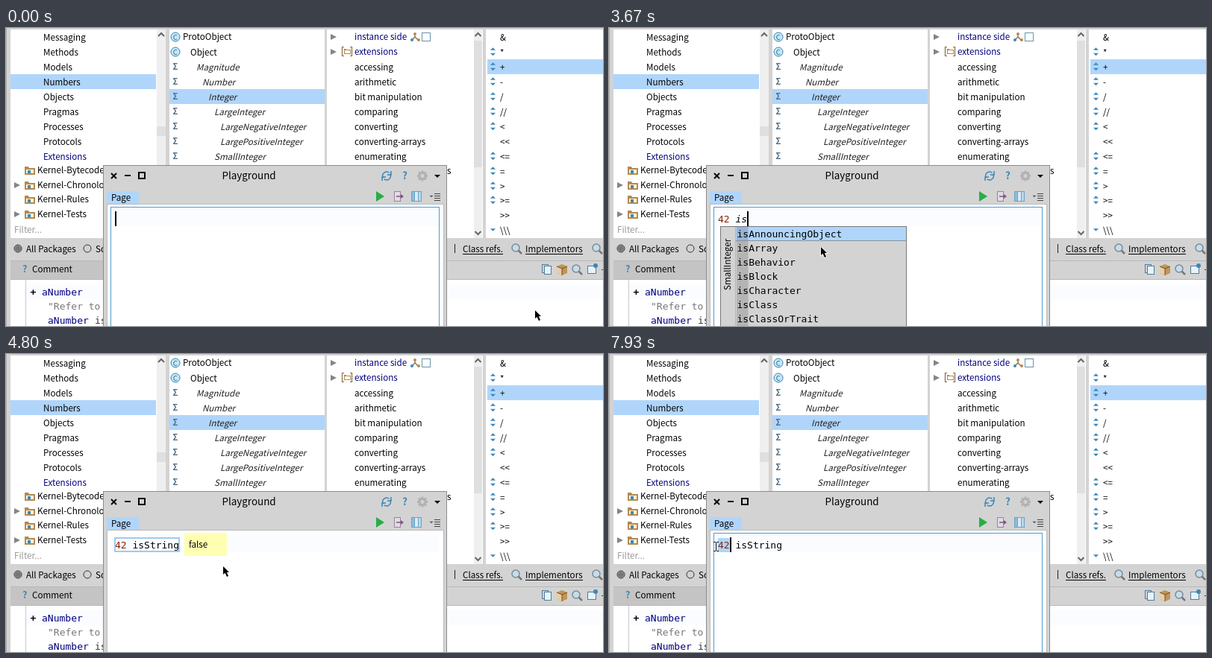
Recreate the animation shown at these times as an HTML page with a canvas. Size 800 by 400 pixels, loop 8 s.

```html
<!DOCTYPE html>
<html lang="en">
<head>
<meta charset="utf-8">
<title>Playground</title>
<style>
  html, body { margin: 0; width: 100%; height: 100%; overflow: hidden; background: #d3d3d3; }
  canvas { display: block; }
</style>
</head>
<body>
<canvas id="stage" width="800" height="400"></canvas>
<script>
const ctx = document.getElementById('stage').getContext('2d');
const LOOP = 8000, TICK = 200 / 3;
const SANS = '"Noto Sans CJK JP", "Noto Sans CJK SC", "Noto Sans CJK", "Open Sans", sans-serif';
const UI = `11.63px ${SANS}`, UI_ITALIC = `italic 11.55px ${SANS}`;
const CODE = '13px "DejaVu Sans Mono", monospace';
const CHAR = 7.8, CODE_X = 146, CODE_Y = 261;
const GRAY = '#d3d3d3', SELECTED = '#b0d5fb', NAVY = '#00007f', BLUE = '#3c87b8', SLATE = '#4f6d85';

function rect(x, y, w, h, color) {
  ctx.fillStyle = color;
  ctx.fillRect(x, y, w, h);
}
function frame(x, y, w, h, color, width = 1) {
  ctx.strokeStyle = color;
  ctx.lineWidth = width;
  ctx.strokeRect(x + width / 2, y + width / 2, w - width, h - width);
}
function text(str, x, y, color = '#000', font = UI) {
  ctx.font = font;
  ctx.fillStyle = color;
  ctx.fillText(str, x, y);
}
function trace(points) {
  ctx.beginPath();
  for (let i = 0; i < points.length; i += 2) ctx.lineTo(points[i], points[i + 1]);
}
function poly(color, ...points) {
  trace(points);
  ctx.fillStyle = color;
  ctx.fill();
}
function line(color, width, ...points) {
  trace(points);
  ctx.strokeStyle = color;
  ctx.lineWidth = width;
  ctx.stroke();
}
function arc(x, y, r, color, width = 1, from = 0, to = 7) {
  ctx.beginPath();
  ctx.arc(x, y, r, from, to);
  ctx.strokeStyle = color;
  ctx.lineWidth = width;
  ctx.stroke();
}
function disc(x, y, r, color) {
  ctx.beginPath();
  ctx.arc(x, y, r, 0, 7);
  ctx.fillStyle = color;
  ctx.fill();
}
const up = (x, y, r, color) => poly(color, x - r, y + r / 2, x, y - r / 2, x + r, y + r / 2);
const down = (x, y, r, color) => poly(color, x - r, y - r / 2, x, y + r / 2, x + r, y - r / 2);
const chevron = (x, y, dir) => line('#666', 2, x - 4, y + 2 * dir, x, y - 2 * dir, x + 4, y + 2 * dir);
const expander = (x, y) => poly('#858585', x, y - 4, x + 8, y, x, y + 4);
const rowY = i => Math.round(12 + 20 * i);

function folder(x, y) {
  poly('#b58a50', x, y - 5, x + 5, y - 5, x + 6, y - 3, x + 14, y - 3, x + 14, y + 6, x, y + 6);
  rect(x + 2, y - 1, 10, 5, '#fff2d8');
  rect(x + 4, y, 4, 4, BLUE);
}
function magnifier(x, y) {
  line('#777', 2.5, x + 2, y + 2, x + 7, y + 7);
  disc(x - 1, y - 1, 5, '#c5dcea');
  arc(x - 1, y - 1, 5, '#7c8b95', 1.5);
}
function underlined(str, x, y) {
  text(str, x, y);
  rect(x, y + 2, Math.round(ctx.measureText(str).width), 1, '#000');
}
function scrollbar(x, width, thumbY, thumbHeight) {
  rect(x, 2, width, 280, '#efefef');
  rect(x, thumbY, width, thumbHeight, '#dfdfdf');
  chevron(x + width / 2, 9, 1);
  chevron(x + width / 2, 275, -1);
}

function packagePane() {
  rect(6, 2, 208, 280, '#fff');
  rect(6, 62, 195, 20, SELECTED);
  ['Messaging', 'Methods', 'Models', 'Numbers', 'Objects', 'Pragmas', 'Processes', 'Protocols', 'Extensions']
    .forEach((name, i) => text(name, 50, rowY(i) + 5, i === 8 ? NAVY : '#000'));
  ['Kernel-Bytecodes', 'Kernel-Chronology', 'Kernel-Rules', 'Kernel-Tests'].forEach((name, i) => {
    const y = Math.round(191 + 19.7 * i);
    folder(25, y);
    text(name, 42, y + 4);
    if (i % 2) expander(11, y);
  });
  text('Filter...', 11, 275, '#999');
  scrollbar(202, 12, 132, 13);
}

function classPane() {
  rect(219, 2, 208, 280, '#fff');
  rect(219, 82, 208, 20, SELECTED);
  [['ProtoObject', 237], ['Object', 247], ['Magnitude', 256], ['Number', 264], ['Integer', 272],
   ['LargeInteger', 280], ['LargeNegativeInteger', 288], ['LargePositiveInteger', 288], ['SmallInteger', 280]]
    .forEach(([name, x], i) => {
      const y = rowY(i);
      if (i < 2) {
        disc(227, y, 6.5, '#c8e7f5');
        arc(227, y, 6, BLUE);
        text('C', 223.7, y + 3.8, '#28678d', `9.5px ${SANS}`);
        text(name, x, y + 4 + i);
      } else {
        text('Σ', 223.5, y + 4, SLATE, `bold 11px ${SANS}`);
        text(name, x - 1, y + 5, '#222', UI_ITALIC);
      }
    });
}

function protocolPane() {
  rect(430, 2, 209, 280, '#fff');
  ['instance side', 'extensions', 'accessing', 'arithmetic', 'bit manipulation', 'comparing', 'converting',
   'converting-arrays', 'enumerating']
    .forEach((name, i) => {
      const y = rowY(i), special = i < 2;
      if (special) expander(435, y);
      text(name, 467, y + (special ? 4 : 5), special ? NAVY : '#000');
    });
  text('s', 591, 196);
  line('#8a6b42', 1.3, 548, 7, 548, 12, 543, 17, 548, 12, 553, 17);
  disc(548, 8, 2, '#b58a50');
  disc(544, 16, 2, BLUE);
  disc(553, 16, 2, '#b58a50');
  frame(557, 6, 12, 12, '#6794b2');
  line('#8a6b42', 1.2, 453, 25.5, 450.5, 25.5, 450.5, 37.5, 453, 37.5);
  line('#8a6b42', 1.2, 461, 25.5, 463.5, 25.5, 463.5, 37.5, 461, 37.5);
  rect(453, 28, 3, 2, '#b58a50');
  frame(453, 29, 9, 6, '#b58a50');
  scrollbar(627, 11, 17, 170);
}

function methodPane() {
  rect(643, 2, 157, 280, '#fff');
  rect(645, 42, 155, 20, SELECTED);
  ['&', '*', '+', '-', '/', '//', '<', '<<', '<=', '=', '>', '>=', '>>', '\\\\\\'].forEach((name, i) => {
    const y = Math.round(12 + 19.95 * i);
    if (![0, 7, 12, 13].includes(i)) up(652.5, y - 4, 3.5, BLUE);
    if (![0, 7, 12].includes(i)) down(652.5, y + (i === 13 ? 0 : 3.5), 3.5, BLUE);
    text(name, 662, y + 5);
  });
}

function toolbarAndComment() {
  disc(16, 296, 4, '#777');
  arc(16, 296, 5, '#333');
  text('All Packages', 27, 301);
  arc(109, 296, 5, '#333');
  text('Scoped View', 120, 301);
  rect(601, 290, 1, 12, '#222');
  underlined('Class refs.', 612, 301);
  magnifier(684, 296);
  underlined('Implementors', 696, 301);
  magnifier(792, 296);

  rect(6, 312, 140, 25, '#c4c4c4');
  rect(6, 312, 794, 1, '#b8b8b8');
  text('?', 22, 328, BLUE, `bold 12.5px ${SANS}`);
  text('Comment', 35, 328);
  frame(718, 317, 9, 12, '#527b96');
  rect(721, 319, 10, 12, '#e6f3fa');
  frame(721, 319, 10, 12, '#527b96');
  poly('#c39455', 738, 320, 745, 317, 752, 320, 752, 329, 745, 332, 738, 329);
  poly('#e6cfa4', 738, 320, 745, 323, 745, 332, 738, 329);
  line('#72502b', 1, 738, 320, 745, 323, 752, 320);
  line('#72502b', 1, 745, 323, 745, 332);
  magnifier(765, 324);
  rect(779, 319, 12, 11, '#e6f3fa');
  frame(779, 319, 12, 11, '#527b96');
  disc(790, 319, 3, BLUE);
  rect(798, 324, 2, 1, '#444');

  rect(6, 337, 794, 63, '#fff');
  rect(6, 337, 794, 1, '#b8b8b8');
  rect(27, 344, 773, 20, '#fafcff');
  rect(26, 338, 1, 62, '#c8c8c8');
  text('+', 32.5, 359, '#000', `bold ${CODE}`);
  text('aNumber', 48, 359, NAVY, CODE);
  text('"Refer to', 56, 378, '#777', CODE);
  text('aNumber', 56, 397, NAVY, CODE);
  text('is', 119, 397, '#333', CODE);
}

function playground(focused) {
  rect(130, 184, 461, 216, GRAY);
  frame(130, 184, 461, 220, '#8c8c8c');
  line('#000', 2, 141, 195, 148, 202);
  line('#000', 2, 148, 195, 141, 202);
  rect(159, 197, 8, 2, '#000');
  frame(177, 193, 10, 10, '#000', 2);
  text('Playground', 289.5, 203, '#000', `13.4px ${SANS}`);

  arc(510, 198.5, 5.5, BLUE, 1.5, 2.6, 5.4);
  arc(510, 198.5, 5.5, BLUE, 1.5, -0.5, 2.2);
  line(BLUE, 1.5, 511, 197, 516, 197, 516, 192);
  line(BLUE, 1.5, 509, 200, 504, 200, 504, 205);
  text('?', 531, 203, BLUE, `bold 13.5px ${SANS}`);
  for (let i = 0; i < 8; i++) {
    const c = Math.cos(i * Math.PI / 4), s = Math.sin(i * Math.PI / 4);
    line('#b2b2b2', 3, 558 + 4 * c, 198.5 + 4 * s, 558 + 7 * c, 198.5 + 7 * s);
  }
  arc(558, 198.5, 4, '#b2b2b2', 3);
  down(578, 199, 4, '#000');

  rect(135, 219, 43, 18, SELECTED);
  text('Page', 141, 232);
  poly('#27ae45', 496, 219, 507, 226, 496, 233);
  rect(520, 219, 9, 14, '#e2dce4');
  frame(520, 219, 9, 14, '#98839f');
  line('#83518a', 1.5, 523, 226, 531, 226);
  poly('#83518a', 529, 223, 533, 226, 529, 229);
  rect(543, 219, 14, 14, '#dcecf5');
  rect(543, 219, 5, 14, '#8fbcd8');
  rect(552, 219, 5, 14, '#b8d8ea');
  frame(543, 219, 14, 14, '#6ba3c5');
  for (const x of [547, 552]) rect(x, 219, 1, 14, '#6ba3c5');
  down(570, 226, 2.5, '#555');
  for (let y = 222; y < 232; y += 3) rect(574, y, 8, 1, '#444');

  rect(135, 236, 452, 164, '#fff');
  frame(135, 236, 452, 170, '#bcbcbc');
  rect(141, 241, 439, 25, '#fafcff');
  if (focused) frame(140, 240, 441, 170, '#4f9bd0');
}

const KEYSTROKES = [1400, 1667, 2133, 3267, 3400, 3800, 3933, 4133, 4267, 4333, 4467];
const SOURCE = '42 isString';
const SUGGESTIONS = {
  is: ['isAnnouncingObject', 'isArray', 'isBehavior', 'isBlock', 'isCharacter', 'isClass', 'isClassOrTrait', 'isClosure'],
  isS: ['isSelfEvaluating', 'isSequence', 'isSharedPool', 'isStateless', 'isStream', 'isString', 'isSymbol', 'isSystem'],
  isSt: ['isStateless', 'isStream', 'isString'],
  isStr: ['isStream', 'isString'],
};

function completion(prefix) {
  const names = SUGGESTIONS[prefix] || ['isString'];
  const height = Math.max(103, names.length * 19 + 22);
  rect(149, 266, 250, height, GRAY);
  rect(170, 267, 228, 19, SELECTED);
  names.forEach((name, i) => {
    rect(171, 267 + 19 * i, prefix.length * CHAR, 19, 'rgba(0, 0, 0, 0.15)');
    text(name, 171.5, 281 + 19 * i, '#000', CODE);
  });
  rect(170, 285, 228, 1, '#8a9199');
  text('cmd-> open detail', 170, 280 + 19 * names.length, '#8a8a8a');
  rect(169, 267, 1, height - 1, '#b4b4b4');
  frame(149, 266, 250, height, '#777');
  ctx.save();
  ctx.translate(163, 352);
  ctx.rotate(-Math.PI / 2);
  text('SmallInteger', 0, 0);
  ctx.restore();
}

function editor(t, printing) {
  const count = KEYSTROKES.filter(k => t >= k - 1).length;
  const typed = SOURCE.slice(0, count), word = typed.slice(3);
  const selectedFrom = t >= 7730 ? 0 : t >= 7660 ? 1 : 2;
  rect(CODE_X + selectedFrom * CHAR, 247, (2 - selectedFrom) * CHAR, 19, SELECTED);
  text(typed.slice(0, 2), CODE_X, CODE_Y, '#8b2500', CODE);
  text(word, CODE_X + 3 * CHAR, CODE_Y, '#000', count < SOURCE.length ? `italic ${CODE}` : CODE);

  if (printing) {
    frame(145, 246, 88, 20, '#9fcbee', 2);
    rect(239, 240, 57, 31, '#ffffb3');
    text('false', 245, 260);
    rect(279, 261, 1, 1, '#e8e8a0');
    rect(287, 261, 1, 1, '#e8e8a0');
  }
  const clicked = t >= 7530;
  const blinkedOff = (t >= 366 && t < 866) || (t >= 6466 && !clicked);
  if (!printing && !blinkedOff) rect(Math.round(CODE_X + CHAR * (clicked ? 2 : count)), 246, 2, 20, '#000');
  if (t >= 3666 && t < 4466) completion(word);
}

// Time, x, y of the pointer's hot spot.
const POINTER = [
  [0, 709, 379], [200, 520, 349], [400, 290, 297], [467, 273, 291], [600, 273, 291], [667, 276, 287],
  [733, 278, 284], [2067, 278, 284], [2333, 277, 282], [2867, 277, 282], [2933, 280, 276], [3000, 281, 272],
  [3133, 282, 274], [3200, 282, 274], [3467, 284, 294], [3667, 284, 294], [3933, 291, 285], [4867, 291, 285],
  [5333, 345, 188], [7000, 345, 188], [7067, 254, 206], [7333, 186, 244], [7533, 165, 258], [7867, 152, 258],
  [7933, 143, 258],
];

function pointer(t) {
  const next = POINTER.findIndex(key => key[0] > t);
  const b = POINTER[next < 0 ? POINTER.length - 1 : next];
  const a = next < 0 ? b : POINTER[next - 1];
  const f = a === b ? 0 : (t - a[0]) / (b[0] - a[0]);
  const x = Math.round(a[1] + (b[1] - a[1]) * f), y = Math.round(a[2] + (b[2] - a[2]) * f);
  if (t >= 7390) {
    rect(x, y - 5, 1, 11, '#000');
    for (const end of [y - 6, y + 6]) {
      rect(x - 3, end, 3, 1, '#000');
      rect(x + 1, end, 3, 1, '#000');
    }
    return;
  }
  const shape = [0, 0, 0, 11, 2.5, 8.7, 5, 14, 7, 13, 4.8, 8, 8, 8].map((v, i) => v + (i % 2 ? y : x));
  line('#fff', 1.5, ...shape, x, y);
  poly('#000', ...shape);
}

function draw(now) {
  const t = Math.floor((now % LOOP + 4) / TICK) * TICK % LOOP;
  const printing = t >= 4799 && t < 5466;
  rect(0, 0, 800, 400, GRAY);
  rect(0, 0, 1, 400, '#b0b0b0');
  packagePane();
  classPane();
  protocolPane();
  methodPane();
  toolbarAndComment();
  playground(!printing);
  editor(t, printing);
  pointer(t);
}

const start = performance.now();
function tick() {
  draw(performance.now() - start);
  requestAnimationFrame(tick);
}
tick();
</script>
</body>
</html>
```
